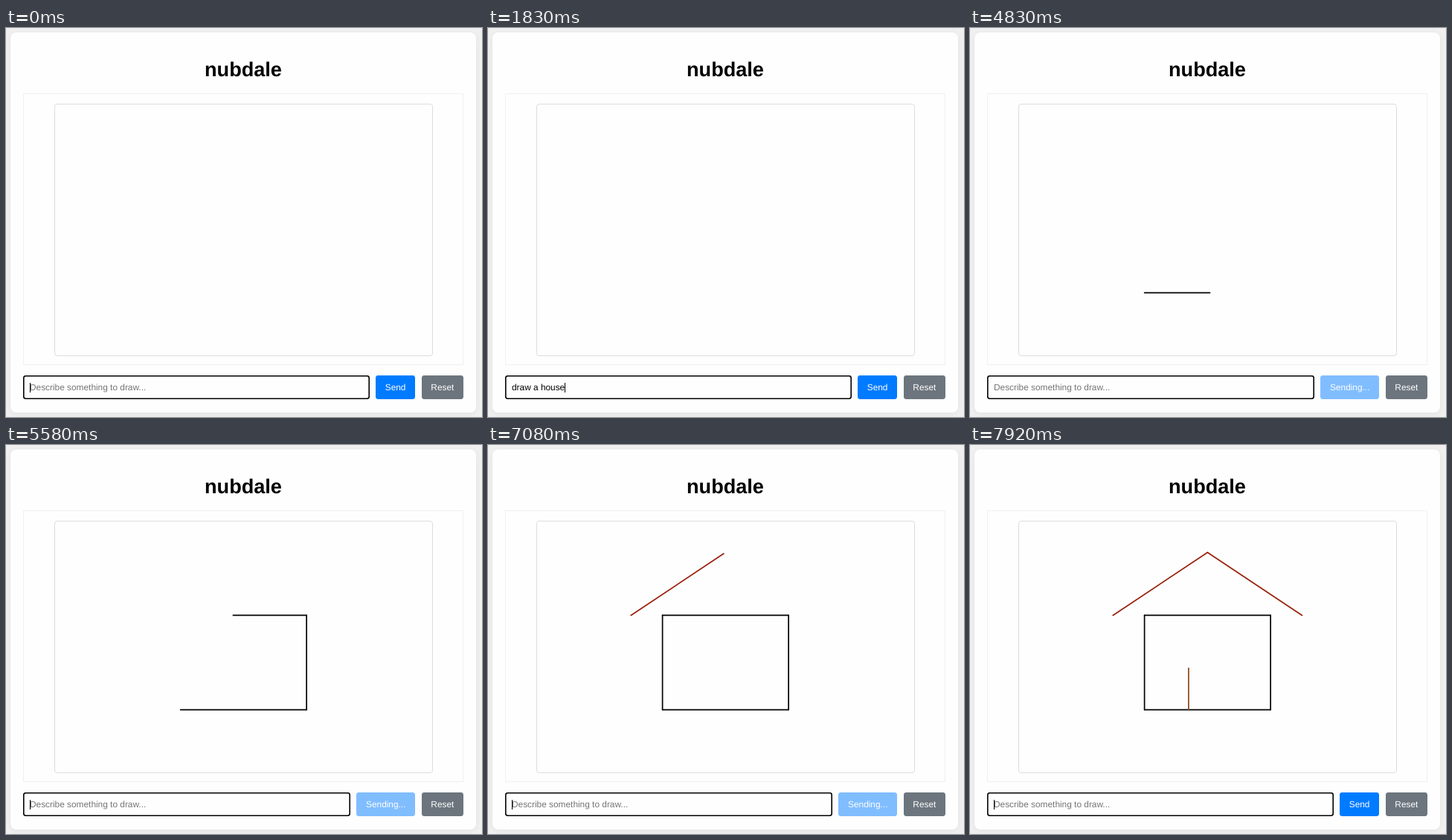
Recreate the animation shown at these times as an HTML page. Size 640 px wide and 524 px high, loop 8 s.

```html
<!DOCTYPE html>
<html lang="en">
<head>
<meta charset="utf-8">
<title>nubdale</title>
<style>
  html, body { margin: 0; width: 100%; height: 100%; overflow: hidden; background: #f0f0f0; }
  body { position: relative; font: 11.86px "Liberation Sans", Arial, sans-serif; text-rendering: geometricPrecision; }
  .card, .panel, h1, svg, .row { position: absolute; box-sizing: border-box; }
  .card { left: 6px; top: 6px; width: 626px; height: 512px; border-radius: 8px; background: #fefefe; box-shadow: 0 2px 8px rgba(0, 0, 0, .06); }
  .panel { left: 23px; top: 88px; width: 592px; height: 366px; border: 1px solid #f0f0ee; }
  h1 { left: 0; top: 40px; width: 638px; margin: 0; font-size: 27.1px; line-height: 32px; text-align: center; }
  svg { left: 0; top: 0; width: 640px; height: 524px; }
  .row { left: 23px; top: 468px; width: 592px; height: 32px; display: flex; gap: 8.5px; line-height: 32px; white-space: pre; }
  .field { flex: 1; position: relative; padding-left: 9px; border-radius: 3.4px; background: #fefefe; box-shadow: inset 0 0 0 1.6px #000; }
  .caret { position: absolute; top: 10px; width: 1px; height: 13px; background: #000; }
  .hint { color: #757575; }
  .button { padding: 0 12.7px; border-radius: 3.4px; color: #fff; background: #007bff; }
  .button.busy { background: #80bdff; }
  .button.reset { background: #6c757d; }
</style>
</head>
<body>
<div class="card"></div>
<div class="panel"></div>
<h1>nubdale</h1>
<svg viewBox="0 0 640 524">
  <rect x="65.5" y="102.5" width="508" height="339" rx="3.4" fill="none" stroke="#dcdcdc"/>
  <g id="drawing" transform="translate(65.1 102.3) scale(.8475)" stroke-width="2" stroke-linecap="round"></g>
</svg>
<div class="row">
  <div class="field"><span id="typed"></span><span class="caret" id="caret"></span><span class="hint" id="hint">Describe something to draw...</span></div>
  <div class="button" id="send">Send</div>
  <div class="button reset">Reset</div>
</div>
<script>
  const LOOP = 8000, TICK = 1000 / 12;
  const PROMPT = 'draw a house';

  // All schedule values are counted in ticks.
  const KEYS = [5, 7, 8, 11, 12, 13, 14, 17, 19, 20, 21, 22];
  const BLINKS = [29, 36, 44, 51, 58, 65, 72, 80, 87, 94];
  const SENT = 25, DONE = 88;

  const WALL = '#000', ROOF = '#992008', DOOR = '#8b4513';
  const strokes = [
    { from: [200, 300], to: [400, 300], color: WALL, start: 55.95, span: 3.95 },
    { from: [400, 300], to: [400, 150], color: WALL, start: 60.3, span: 3.95 },
    { from: [400, 150], to: [200, 150], color: WALL, start: 64.7, span: 3.95 },
    { from: [200, 150], to: [200, 300], color: WALL, start: 69.05, span: 3.95 },
    { from: [150, 150], to: [300, 50], color: ROOF, start: 79.8, span: 5.3 },
    { from: [300, 50], to: [450, 150], color: ROOF, start: 87, span: 3, power: 2 },
    { from: [270, 300], to: [270, 234], color: DOOR, start: 93.7, span: 1.3 }
  ];

  const byId = id => document.getElementById(id);
  const typed = byId('typed'), caret = byId('caret'), hint = byId('hint'), send = byId('send');

  function setAttrs(node, attrs) {
    for (const name in attrs) node.setAttribute(name, attrs[name]);
  }

  for (const s of strokes) {
    s.line = document.createElementNS('http://www.w3.org/2000/svg', 'line');
    setAttrs(s.line, { x1: s.from[0], y1: s.from[1], stroke: s.color });
    byId('drawing').append(s.line);
  }

  function drawStroke({ from, to, start, span, power = 1, line }, tick) {
    const p = Math.min(1, Math.max(0, (tick - start) / span)) ** power;
    const [x2, y2] = from.map((v, i) => v + (to[i] - v) * p);
    setAttrs(line, { x2, y2, visibility: p > 0 ? 'visible' : 'hidden' });
  }

  function render(ms) {
    // A few ms of slack absorb the rounding of tick times.
    const tick = Math.floor((ms % LOOP + 4) / TICK) % 96;
    const passed = list => list.filter(t => t <= tick).length;
    const text = tick < SENT ? PROMPT.slice(0, passed(KEYS)) : '';
    const busy = tick >= SENT && tick < DONE;

    typed.textContent = text;
    hint.hidden = text !== '';
    caret.style.visibility = passed(BLINKS) % 2 ? 'hidden' : 'visible';
    send.textContent = busy ? 'Sending...' : 'Send';
    send.classList.toggle('busy', busy);
    for (const s of strokes) drawStroke(s, tick);
  }

  const begin = performance.now();
  function loop() {
    render(performance.now() - begin);
    requestAnimationFrame(loop);
  }
  loop();
</script>
</body>
</html>
```
